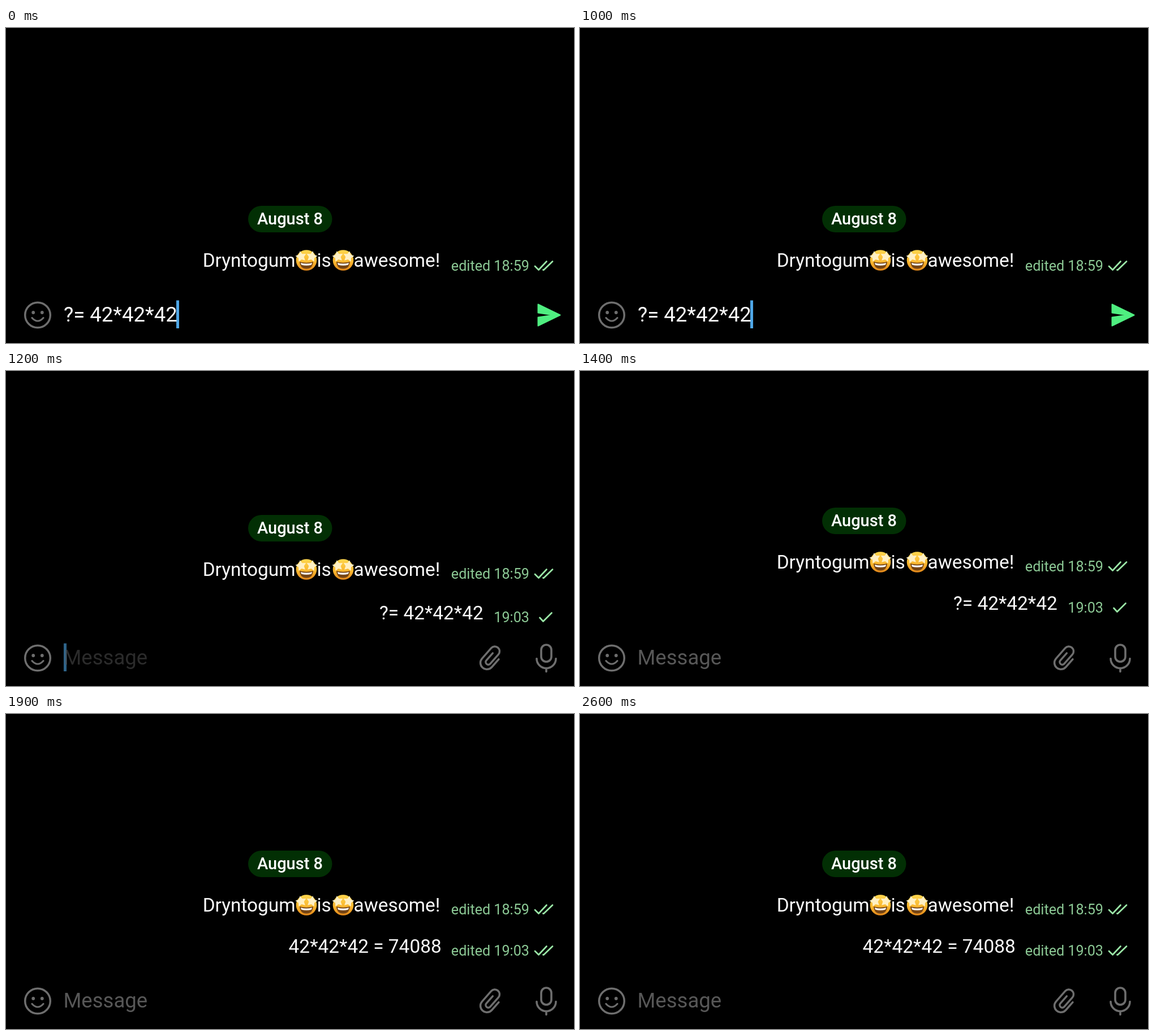
An HTML page with a canvas for the animation above (2700 ms loop, 1004 px wide and 558 px high).

```html
<!DOCTYPE html>
<html lang="en">
<head>
<meta charset="utf-8">
<title>Chat calculator</title>
<style>
html, body { margin: 0; height: 100%; overflow: hidden; background: #000; }
canvas { display: block; }
</style>
</head>
<body>
<canvas id="stage" width="1004" height="558"></canvas>
<script>
const ctx = document.getElementById('stage').getContext('2d');
const LOOP = 2700, STEP = 100, SEND = 1091, EDIT = 1603, READ = 1500;
const WHITE = '#fafafa', GRAY = '#6e6e6e', MINT = '#8cc995', TICK = '#9ae6a6';
const BODY = 33.4, FIELD = 36.5, STAMP = 25.2;
const SUM = '42*42*42';

const clamp = v => Math.max(0, Math.min(1, v));
const mix = (a, b, p) => a + (b - a) * p;
const easeOut = u => 1 - (1 - u) ** 3;

function text(str, x, y, size, color = WHITE, alpha = 1, align = 'left', weight = 400) {
  ctx.font = `${weight} ${size}px Roboto, sans-serif`;
  ctx.textAlign = align;
  ctx.fillStyle = color;
  ctx.globalAlpha = alpha;
  ctx.fillText(str, x, y);
  ctx.globalAlpha = 1;
}

function line(d, color, width) {
  ctx.strokeStyle = color;
  ctx.lineWidth = width;
  ctx.stroke(new Path2D(d));
}

function shape(d, color) {
  ctx.fillStyle = color;
  ctx.fill(new Path2D(d));
}

// Draws in a local frame around (x, y)
function at(x, y, draw, scale = 1, alpha = 1) {
  if (scale <= 0 || alpha <= 0) return;
  ctx.save();
  ctx.translate(x, y);
  ctx.scale(scale, scale);
  ctx.globalAlpha = alpha;
  draw();
  ctx.restore();
}

function star(cx, cy, r, turn) {
  ctx.beginPath();
  for (let i = 0; i < 10; i++) {
    const a = turn + i * Math.PI / 5 - Math.PI / 2;
    const d = i % 2 ? r * 0.52 : r;
    ctx.lineTo(cx + d * Math.cos(a), cy + d * Math.sin(a));
  }
  ctx.closePath();
  ctx.fillStyle = '#fff0c4';
  ctx.fill();
}

function starEyes() {
  const skin = ctx.createLinearGradient(0, -18, 0, 18);
  skin.addColorStop(0, '#ffd64d');
  skin.addColorStop(0.6, '#f9b52d');
  skin.addColorStop(1, '#e0861a');
  ctx.beginPath();
  ctx.arc(0, 0, 18.3, 0, 7);
  ctx.fillStyle = skin;
  ctx.fill();
  shape('M-12 2.5Q0 6 12 2.5Q11 15 0 15Q-11 15 -12 2.5Z', '#744414');
  shape('M-10 4.5Q0 7.5 10 4.5L9 8Q0 10.5 -9 8Z', '#fff');
  star(-9.5, -6.5, 10, -0.2);
  star(9.5, -6.5, 10, 0.2);
}

function smiley() {
  line('M22.3 0A22.3 22.3 0 1 1 -22.3 0A22.3 22.3 0 1 1 22.3 0', GRAY, 3.5);
  line('M-10 5Q0 16 10 5', GRAY, 3.2);
  for (const x of [-7.8, 7.8]) {
    ctx.beginPath();
    ctx.arc(x, -4.5, 2.9, 0, 7);
    ctx.fillStyle = GRAY;
    ctx.fill();
  }
}

function clip() {
  ctx.rotate(0.72);
  line('M-3.5 -9V8A4.5 4.5 0 0 0 5.5 8V-14A8.5 8.5 0 0 0 -11.5 -14V10.5A11.5 11.5 0 0 0 11.5 10.5V-8', GRAY, 3.5);
}

function mic() {
  line('M-9 -14.5A9 9 0 0 1 9 -14.5V-2.5A9 9 0 0 1 -9 -2.5ZM-17 1A17 17 0 0 0 17 1M0 18V24', GRAY, 3.6);
}

function send() {
  const d = 'M-19 -19L20 0L-19 19V4L8 0L-19 -4Z';
  shape(d, '#4fee80');
  line(d, '#4fee80', 2);
}

const ticks = () => line('M-15.5 1L-9 7.5L5 -7.5M-1 7.5L0 7.5L15.5 -7.5', TICK, 2.8);
const tick = () => line('M-7 1L-1 7.5L14 -7.5', TICK, 2.8);

function history(p) {
  const y = Math.round(mix(0, -73, p));
  ctx.fillStyle = '#022f04';
  ctx.beginPath();
  ctx.roundRect(428, 315 + y, 148.5, 47, 23.5);
  ctx.fill();
  text('August 8', 502, 348 + y, 29, '#fff', 1, 'center', 500);

  text('Dryntogum', 511.5, 423 + y, BODY, WHITE, 1, 'right');
  at(531, 411.5 + y, starEyes);
  text('is', 549.5, 423 + y, BODY);
  at(596, 411.5 + y, starEyes);
  text('awesome!', 614.5, 423 + y, BODY);

  const stamp = 430 + y - Math.round(2 * clamp(p * 1.2));
  text('edited', 786.8, stamp, STAMP, MINT);
  text('18:59', 925, stamp, STAMP, MINT, 1, 'right');
  at(950.5, stamp - 9, ticks);
}

function answer(t, p, quick) {
  const e = easeOut(clamp((t - EDIT) / 250));
  const y = Math.round(mix(520, 423, p));
  const x = mix(mix(103, 660, quick), 499.6, e);
  const size = mix(FIELD, BODY, quick);
  if (e < 1) text('?= ' + SUM, x, y, size, WHITE, 1 - e);
  if (e > 0) text(SUM + ' = 74088', x, y, size, WHITE, e);
  text('edited', 786.8, y + 5, STAMP, MINT, e);
  text('19:03', 925, y + 5, STAMP, MINT, quick, 'right');
  at(950.5, y - 4, t < READ ? tick : ticks, 1, quick);
}

function render(t) {
  const u = clamp((t - SEND) / 250);
  const p = easeOut(u);
  const quick = clamp(u * 2.3);
  const fade = clamp((t - SEND) / 220);
  const sent = t >= SEND;

  ctx.fillStyle = '#000';
  ctx.fillRect(0, 0, 1004, 558);
  ctx.lineCap = ctx.lineJoin = 'round';

  history(p);
  at(56, 508.5, smiley);
  at(959.5, 508.5, send, 1 - quick);
  at(857, 509, clip, 1, quick);
  at(955, 508.5, mic, quick, quick);

  if ((t + 90) % 1000 < 480) {
    ctx.globalAlpha = sent ? 0.2 + 0.8 * fade : 1;
    ctx.fillStyle = '#4ea6e6';
    ctx.fillRect(sent ? 102 : 301, 482.5, 5, 49.5);
    ctx.globalAlpha = 1;
  }
  if (sent) {
    text('Message', 101.5, 520, FIELD, '#575757', fade);
    answer(t, p, quick);
  } else {
    text('?= ' + SUM, 102, 520, FIELD);
  }
}

const start = performance.now();
function loop() {
  const t = (performance.now() - start) % LOOP;
  render(Math.floor(t / STEP) * STEP);
  requestAnimationFrame(loop);
}
loop();
</script>
</body>
</html>
```
